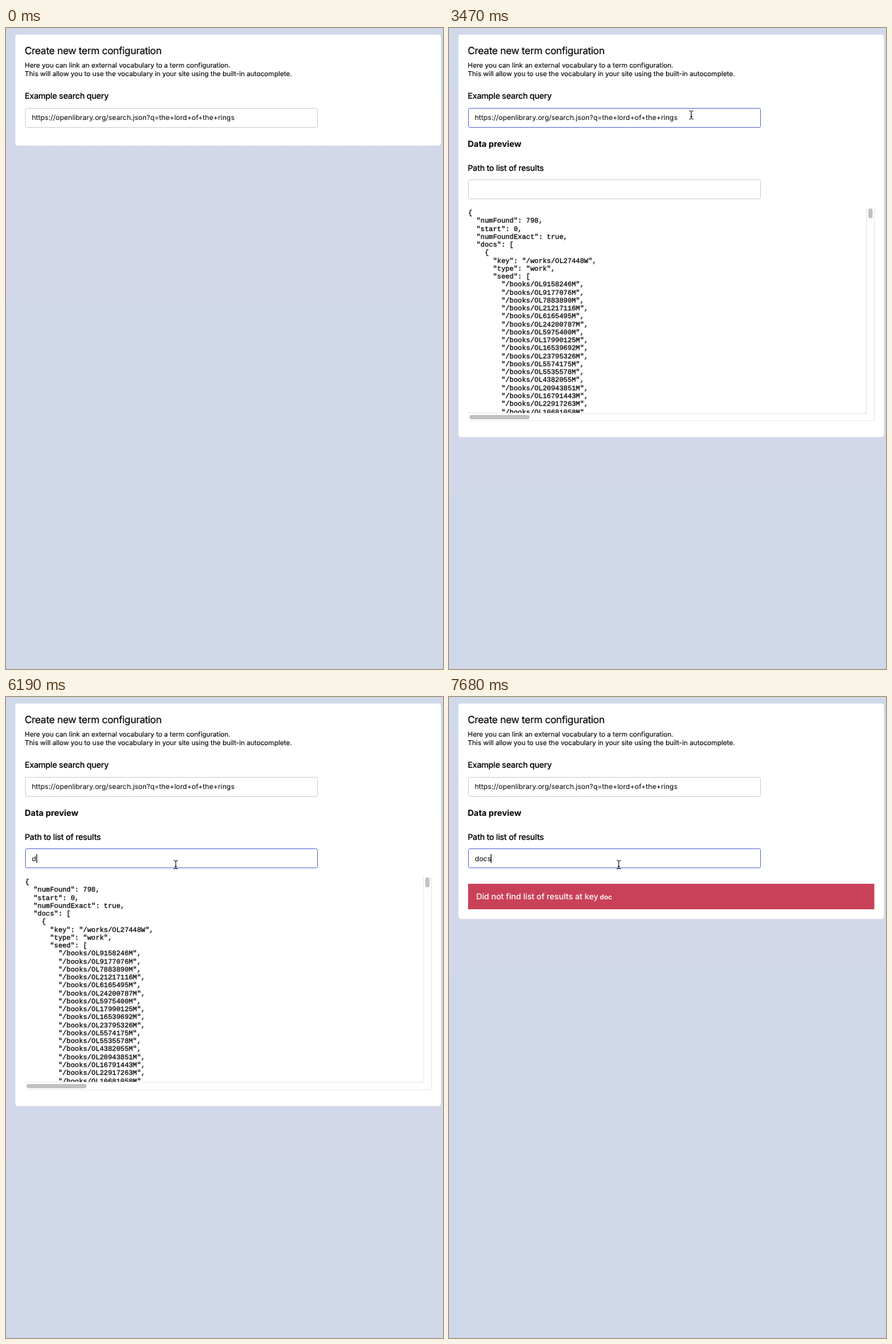
These frames come from a looping animation (618x906 px, 8000 ms). An HTML page:

```html
<!DOCTYPE html>
<html lang="en">
<head>
<meta charset="utf-8">
<title>Term configuration</title>
<style>
  html, body { margin: 0; height: 100%; overflow: hidden; background: #cfd8e8; }
  svg { display: block; width: 618px; height: 906px; }
  text { font: 9.91px Inter, sans-serif; white-space: pre; text-rendering: geometricPrecision; }
  .title { font-size: 14px; letter-spacing: -.28px; stroke: #000; stroke-width: .15; }
  .intro { font-size: 9.5px; stroke: #000; stroke-width: .12; }
  .label { font-size: 11.6px; font-weight: 500; letter-spacing: -.23px; stroke: #000; stroke-width: .1; }
  .heading { font-size: 11.9px; font-weight: 700; }
  .error { font-size: 11.6px; font-weight: 500; letter-spacing: -.05px; fill: #fff; }
  .code { font: 9.78px "Liberation Mono", "Courier New", monospace; letter-spacing: 0; stroke: #000; stroke-width: .25; }
  .error .code { font-weight: bold; stroke: none; }
  .field { fill: #fff; stroke: #d3d3d3; }
  .field.focus { stroke: #6c7ade; }
  .track { fill: none; stroke: #e9e9e9; }
  .thumb { fill: #c1c1c1; }
</style>
</head>
<body>
<svg viewBox="0 0 618 906">
  <defs>
    <linearGradient id="tint" x2="0" y2="1">
      <stop stop-color="#cfd9ea"/>
      <stop offset=".6" stop-color="#d2d7e9"/>
    </linearGradient>
    <clipPath id="view"><path d="M27 254H590V544H27z"/></clipPath>
  </defs>
  <rect id="band" width="618" height="387" fill="url(#tint)"/>
  <rect id="card" x="13.3" y="9.3" width="601.7" height="157" rx="4" fill="#fff"/>

  <text class="title" x="26.4" y="37">Create new term configuration</text>
  <text class="intro" x="26.6" y="56.4">Here you can link an external vocabulary to a term configuration.</text>
  <text class="intro" x="26.6" y="67.7">This will allow you to use the vocabulary in your site using the built-in autocomplete.</text>
  <text class="label" x="26.4" y="100.2">Example search query</text>
  <rect class="field" id="query" x="27.5" y="113.5" width="413" height="27" rx="2"/>
  <text x="36.4" y="130">https://openlibrary.org/search.json?q=the+lord+of+the+rings</text>

  <g id="preview">
    <text class="heading" x="26.4" y="167.6">Data preview</text>
    <text class="label" x="26.4" y="201.5">Path to list of results</text>
    <rect class="field" id="path" x="27.5" y="214.5" width="413" height="27" rx="2"/>
    <text id="typed" x="36.6" y="231.7"></text>
  </g>

  <g id="data">
    <g id="lines" clip-path="url(#view)"></g>
    <path class="track" d="M590.5 254V544.5H27M601.5 254V555H27"/>
    <rect class="thumb" x="593" y="255" width="6" height="14" rx="3"/>
    <rect class="thumb" x="29" y="547" width="85" height="6" rx="3"/>
  </g>

  <g id="error">
    <path d="M27 264H601.5V300H27z" fill="#c94159"/>
    <text class="error" x="38.4" y="286">Did not find list of results at key <tspan class="code" x="213.3">doc</tspan></text>
  </g>

  <path id="caret" d="M0 0V12.5" stroke="#000"/>
  <g id="beam" fill="none" stroke-linecap="round">
    <path d="M-2.5 -6Q0 -6 0 -4.5V4.5Q0 6 -2.5 6M2.5 -6Q0 -6 0 -4.5M0 4.5Q0 6 2.5 6M-1.2 2.5H1.2" stroke="#fff" stroke-width="2"/>
    <path d="M-2.5 -6Q0 -6 0 -4.5V4.5Q0 6 -2.5 6M2.5 -6Q0 -6 0 -4.5M0 4.5Q0 6 2.5 6M-1.2 2.5H1.2" stroke="#111"/>
  </g>
  <path id="arrow" d="M0 0V11.5L2.6 9.2L4.5 13.4L6.4 12.6L4.6 8.5H8.2z" stroke="#fff" stroke-width=".8"/>
</svg>
<script>
const $ = id => document.getElementById(id);
const show = (id, on) => $(id).style.display = on ? '' : 'none';
const place = (id, x, y) => $(id).setAttribute('transform', `translate(${x} ${y})`);

const books = [9158246, 9177076, 7883890, 21217116, 6165495, 24200787, 5975400, 17990125, 16539692,
  23795326, 5574175, 5535578, 4382055, 20943851, 16791443, 22917263, 10681058];
const json = ['{', '  "numFound": 798,', '  "start": 0,', '  "numFoundExact": true,', '  "docs": [',
  '    {', '      "key": "/works/OL27448W",', '      "type": "work",', '      "seed": [',
  ...books.map(n => `        "/books/OL${n}M",`)];
$('lines').innerHTML = json.map((line, i) =>
  `<text class="code" x="27" y="${264 + i * 11.26}">${line}</text>`).join('');

// Eased progress from 0 to 1 in even steps
function glide(t, start, end, steps) {
  const p = Math.min(1, Math.max(0, Math.floor((t - start) / (end - start) * steps + 1e-6) / steps));
  return p * p * (3 - 2 * p);
}

function pointer(t) {
  if (t < 4180) {
    const p = glide(t, 360, 770, 7);
    return [350 - 7.5 * p, 200 - 77 * p];
  }
  if (t >= 5180) return [240, 237];
  const p = glide(t, 4122, 4760, 10);
  return [342.5 - 102.5 * p, 123 + 113 * p];
}

// Times at which the caret turns on and off in turn
const blinks = [770, 1250, 1730, 2270, 2750, 3470, 3760, 4180, 4760, 5200, 5710, 7380, 7680];
const keys = [6190, 6370, 6840, 7680];

function draw(t) {
  const loaded = t >= 3470, failed = t >= 7080, second = t >= 4760;
  show('preview', loaded);
  show('data', loaded && !failed);
  show('error', failed);
  $('card').setAttribute('height', failed ? 304.5 : loaded ? 569 : 157);
  $('band').setAttribute('height', loaded && !failed ? 655 : 387);
  $('query').classList.toggle('focus', t >= 770 && !second);
  $('path').classList.toggle('focus', second);

  $('typed').textContent = 'docs'.slice(0, keys.filter(k => t >= k).length);
  show('caret', blinks.filter(b => t >= b).length % 2);
  if (second) place('caret', Math.floor(37 + $('typed').getComputedTextLength()) + .5, 222);
  else place('caret', 323.5, 120.3);

  const [x, y] = pointer(t);
  const inField = y < 141 || loaded && y > 214;
  show('beam', t >= 360 && inField);
  show('arrow', t >= 360 && !inField);
  place('beam', x, y);
  place('arrow', x, y);
}

function tick() {
  draw(performance.now() % 8000);
  requestAnimationFrame(tick);
}
tick();
</script>
</body>
</html>
```
